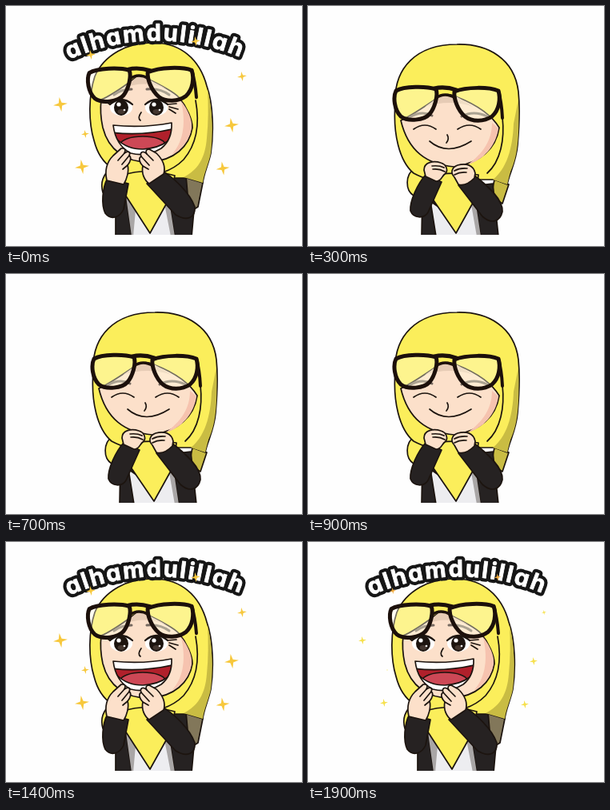
Write an HTML page that moves like this. It is 370 px wide and 300 px high and loops after 2000 ms.

```html
<!DOCTYPE html>
<html lang="id">
<head>
<meta charset="utf-8">
<title>alhamdulillah</title>
<style>
  html, body { margin: 0; width: 100%; height: 100%; overflow: hidden; background: #fefefe; }
  svg { display: block; width: 370px; height: 300px; }
  .pose { stroke: #1c140f; stroke-width: 1.7; stroke-linejoin: round; stroke-linecap: round; }
  .scarf { fill: #fbee5b; }
  .shade { fill: #c9bc43; stroke: none; }
  .skin { fill: #fce0ca; }
  .blush { fill: #f6c3af; stroke: none; }
  .cap { fill: #e6cbb5; stroke: none; }
  .coat { fill: #262222; }
  .shirt { fill: #ededf0; }
  .fold { fill: #a9a6a6; stroke: none; }
  .line { fill: none; }
  .brow { fill: none; stroke: #776a61; stroke-width: 3; }
  .ink { fill: #1c140f; stroke: none; }
  .white { fill: #fff; stroke: none; }
  .frame { stroke: #1c100b; stroke-width: 5; fill: #fffde0; fill-opacity: .38; }
  .arm { fill: none; stroke: #1c100b; }
  text { font: 700 29px Inter, "Open Sans", sans-serif; font-feature-settings: "cv11"; letter-spacing: 2.2px; stroke-linejoin: round; }
  .edge { fill: #161616; stroke: #161616; stroke-width: 9; }
  .fill { fill: #fff; stroke: #fff; stroke-width: .8; }
</style>
</head>
<body>
<svg viewBox="0 0 370 300">
  <defs>
    <path id="arc" d="M79 67A268 268 0 0 1 306 70"/>
    <clipPath id="floor"><path d="M0 0H370V285.5H0Z"/></clipPath>
    <clipPath id="lips"><path id="mouth" d="M134 149Q170 153 207 146Q208 167 194 178Q176 189 156 184Q137 174 134 149Z"/></clipPath>
    <g id="glasses">
      <path class="frame" d="M110 106C120 100 148 100 160 104C163 112 158 128 152 135C145 143 125 145 116 138C108 130 106 114 110 106Z"/>
      <path class="frame" d="M183 107C198 101 226 101 238 106C241 116 239 130 230 138C220 145 205 145 196 138C187 130 182 116 183 107Z"/>
      <path class="arm" stroke-width="5" d="M158 103Q171 100 186 105"/>
      <path class="arm" stroke-width="3.5" d="M160 115Q171 107 184 115"/>
      <path class="arm" stroke-width="4" d="M238 106Q242 120 243 140"/>
    </g>
  </defs>

  <g id="smile" class="pose" clip-path="url(#floor)">
    <path class="shade" style="stroke:#1c140f" d="M233 217L251 223L243 247L229 238Z"/>
    <path class="scarf" d="M132 204C122 211 121 230 132 237L152 228L150 205Z"/>
    <path class="coat" d="M143 232L231 222L238 288H142Z"/>
    <path class="shirt" d="M153 244L184 266L209 242L216 288H160Z"/>
    <path class="fold" d="M204 248L209 242L216 288H211Z"/>
    <path class="scarf" d="M186 48C136 48 107 77 109 122C106 159 114 194 132 209C145 216 158 220 176 217H233L249 223C252 208 260 196 262 174C264 151 265 127 263 107C258 66 225 47 186 48Z"/>
    <path class="shade" d="M263 117C264 153 264 185 253 207L249 223L231 217C248 204 256 178 257 147Z"/>
    <path class="line" d="M243 139C246 166 241 194 224 209"/>
    <path class="scarf" d="M147 214Q173 206 213 211L210 239L185 284L157 243Z"/>
    <path class="skin" d="M116 143C130 137 148 124 163 114Q174 107 187 114C207 122 228 134 239 152C235 178 216 196 183 201C148 198 125 181 116 143Z"/>
    <path class="cap" d="M146 126L163 114Q174 107 187 114L207 126Q177 116 146 126Z"/>
    <path class="blush" d="M238 153C235 176 218 193 200 198C219 184 230 168 230 146Z"/>
    <path class="brow" d="M127 139Q142 130 155 137M192 138Q207 130 224 138"/>
    <use href="#glasses"/>
    <path class="line" d="M132 154Q146 144 160 154M187 154Q202 144 216 154M174 161Q177 166 173 171M152 169Q174 188 204 169"/>
    <path class="coat" d="M147 211C137 222 127 244 128 256C132 266 145 266 150 258L167 220Z"/>
    <path class="coat" d="M207 211C225 225 244 242 243 257C240 270 229 273 218 263L188 224Z"/>
    <path class="skin" d="M145 205C145 195 157 193 166 196C173 198 176 206 171 210C167 213 167 219 160 219L147 213Z"/>
    <path class="skin" d="M209 209C207 199 198 196 187 199C179 202 178 209 183 214L188 223Q197 226 208 215Z"/>
    <path class="line" d="M155 200Q164 199 170 202M156 204Q164 203 171 207M199 203Q190 202 183 206M198 208Q190 207 183 211"/>
  </g>

  <g id="laugh">
    <g class="pose" clip-path="url(#floor)">
      <path class="scarf" d="M131 203C121 211 118 222 121 233L142 228L152 208Z"/>
      <path class="coat" d="M137 226L215 210L238 222L232 288H137Z"/>
      <path style="fill:#82775a" d="M225 212L246 221L240 251L229 258Z"/>
      <path class="shirt" d="M150 238L180 263L203 238L211 288H157Z"/>
      <path class="fold" d="M198 247L203 238L211 288H206ZM150 238L162 255L159 288H157Z"/>
      <path class="scarf" d="M187 46C152 44 122 62 111 88C103 112 103 145 110 168C114 184 122 196 133 203C145 211 160 215 176 215H226L246 221C247 210 253 198 256 184C260 158 259 122 251 100C242 66 218 47 187 46Z"/>
      <path class="shade" d="M252 104C258 130 259 160 256 184C253 198 247 210 246 221L222 214C240 205 249 190 251 165C253 145 253 125 252 104Z"/>
      <path class="line" d="M237 118C242 145 239 172 222 192Q211 203 196 208"/>
      <path class="scarf" d="M147 211Q176 202 211 212L205 239L180 284L149 236Z"/>
      <path class="skin" d="M119 117C132 112 148 100 163 89Q168 86 175 90C192 98 208 106 216 114C226 126 233 142 233 152C229 176 210 193 180 195C150 196 128 180 121 152Q117 134 119 117Z"/>
      <path class="cap" d="M146 103L163 89Q168 86 175 90L200 103Q172 92 146 103Z"/>
      <path class="blush" d="M219 119C228 130 233 143 232 152C230 166 222 178 207 186C220 172 226 150 219 119Z"/>
      <path class="brow" d="M135 111Q144 104 157 104M176 104Q192 102 204 111"/>
      <use href="#glasses" transform="translate(-5.5 -24) rotate(-1.5 174 120)"/>
      <g id="eyes"></g>
      <path class="line" d="M169 133Q164 140 168 143"/>
      <g clip-path="url(#lips)">
        <path fill="#b0202b" stroke="none" d="M130 140H212V192H130Z"/>
        <ellipse cx="171" cy="173" rx="28" ry="10" fill="#cd4856"/>
        <path class="white" d="M130 140H212V153Q171 163 130 158Z"/>
        <path class="white" d="M136 164Q150 179 171 179Q190 178 202 169V195H136Z"/>
        <path class="line" d="M130 158Q171 163 212 153M138 166Q151 179 171 179Q190 178 202 169"/>
      </g>
      <use href="#mouth" fill="none"/>
      <path class="coat" d="M127 215C120 228 119 249 124 259C131 268 142 265 147 254L153 222Z"/>
      <path class="coat" d="M193 205C209 213 230 234 236 251C237 264 227 270 212 261L176 222Z"/>
      <path class="skin" d="M126 218C123 205 126 195 134 187L144 178C149 177 150 180 148 184C153 180 156 183 154 187C157 189 156 194 152 199C154 206 151 217 147 223Z"/>
      <path class="skin" d="M197 210C200 201 196 192 188 184L179 179C175 179 174 182 176 185C171 180 167 183 169 188C165 190 167 196 171 200C169 209 173 218 179 222Z"/>
      <path class="line" d="M148 184L140 193M154 187L145 198M152 199L146 204M176 185L184 193M169 188L179 199M171 200L178 204"/>
    </g>
    <text class="edge"><textPath href="#arc">alhamdulillah</textPath></text>
    <text class="fill"><textPath href="#arc">alhamdulillah</textPath></text>
    <g id="bigStars"></g>
    <g id="smallStars"></g>
  </g>
</svg>
<script>
  const $ = id => document.getElementById(id);
  const LOOP = 2000;
  const STEP = 100;
  const LAUGH_START = 1100;

  const eye = (x, lashes) => `
    <ellipse class="white" cx="${x}" cy="127" rx="14" ry="10"/>
    <ellipse class="ink" cx="${x}" cy="127" rx="9" ry="10"/>
    <ellipse cx="${x}" cy="132" rx="4.5" ry="3" fill="#43362f" stroke="none"/>
    <circle class="white" cx="${x - 3}" cy="123" r="2.6"/>
    <circle class="white" cx="${x + 4}" cy="130" r="1.3"/>
    <path class="line" style="stroke-width:2.2" d="M${x - 14} 123Q${x} 111 ${x + 14} 123"/>
    <path class="line" d="${lashes}"/>`;
  $('eyes').innerHTML =
    eye(144, 'M130 123L127 121') +
    eye(188, 'M202 123L213 122M204 126L215 129M204 129L212 134');

  // x, y, large radius, small radius, small colour
  const GOLD = '#f7c83d', PALE = '#f6e04c', ORANGE = '#f0a93a';
  const stars = [
    [68, 123, 9, 5, PALE], [99, 160, 5, 1, PALE], [95, 201, 9, 5, PALE],
    [295, 88, 6, 3, PALE], [282, 149, 9, 5, PALE], [271, 203, 8.5, 5, PALE],
    [106, 61, 6, 4, ORANGE], [237, 44, 6, 4.5, ORANGE]
  ];

  const star = (x, y, r, color) => {
    let d = '';
    for (let i = 0; i < 8; i++) {
      const a = i * Math.PI / 4 - 0.15;
      const k = i % 2 ? r * 0.3 : r;
      d += `${i ? 'L' : 'M'}${(x + k * Math.cos(a)).toFixed(2)} ${(y + k * Math.sin(a)).toFixed(2)}`;
    }
    return `<path d="${d}Z" fill="${color}"/>`;
  };
  $('bigStars').innerHTML = stars.map(([x, y, big]) => star(x, y, big, GOLD)).join('');
  $('smallStars').innerHTML = stars.map(([x, y, , small, color]) => star(x, y, small, color)).join('');

  // Holds each listed opacity until the next time
  const play = (id, duration, steps) => {
    const frames = steps.map(([time, opacity]) =>
      ({ offset: time / duration, opacity, easing: 'steps(1, end)' }));
    $(id).animate(frames, { duration, iterations: Infinity }).startTime = 0;
  };

  play('laugh', LOOP, [[0, 1], [STEP, 0], [LAUGH_START, 1], [LOOP, 1]]);
  play('smile', LOOP, [[0, 0], [STEP, 1], [LAUGH_START, 0], [LOOP, 0]]);
  // The stars twinkle between two sizes on every step
  play('bigStars', 2 * STEP, [[0, 1], [STEP, 0], [2 * STEP, 1]]);
  play('smallStars', 2 * STEP, [[0, 0], [STEP, 1], [2 * STEP, 0]]);
</script>
</body>
</html>
```
